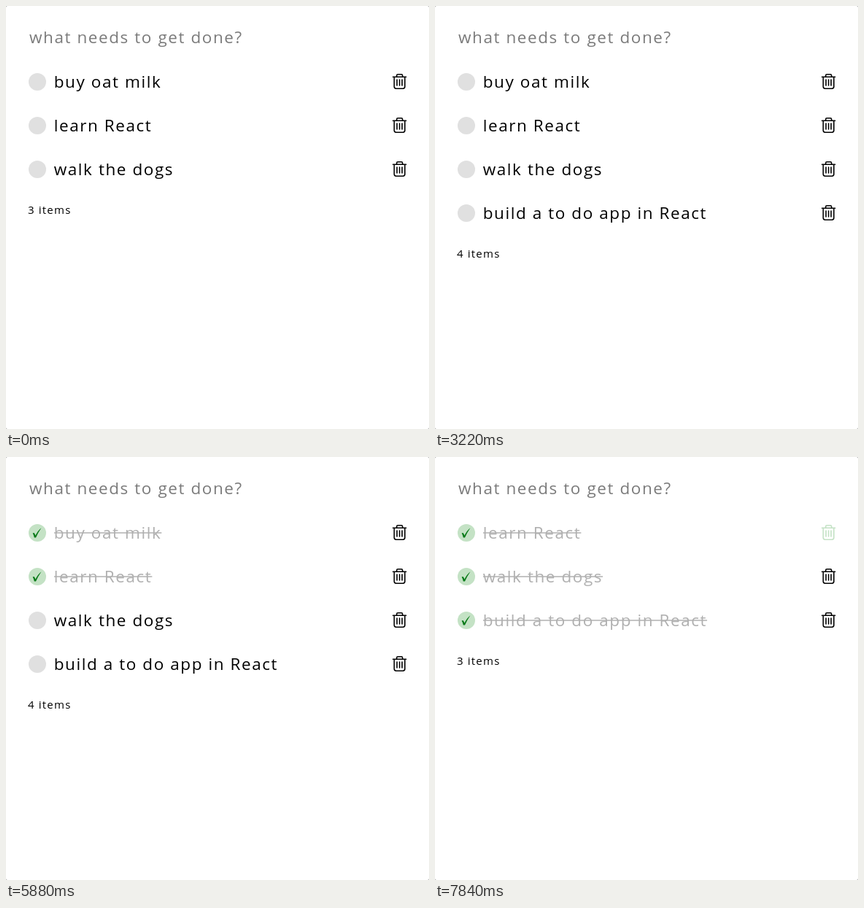
Animation, 580 px wide and 580 px high, one loop 8 s. Source, as an HTML page:

```html
<!DOCTYPE html>
<html lang="en">
<head>
<meta charset="utf-8">
<title>To do list</title>
<style>
  html, body { margin: 0; height: 100%; overflow: hidden; background: #999; }
  svg { display: block; width: 100vw; height: 100vh; }
  text { font: 22.5px "Open Sans", "Noto Sans", sans-serif; letter-spacing: 1.57px; white-space: pre; }
  #count { font-size: 15px; letter-spacing: 1.2px; }
  .bin { fill: none; stroke-width: 1.6; stroke-linecap: round; stroke-linejoin: round; }
</style>
</head>
<body>
<svg id="stage" viewBox="0 0 580 580">
  <rect width="580" height="580" rx="2" fill="#fff"/>
  <text id="field" x="32" y="51"></text>
  <rect id="caret" y="29" height="28" fill="#45607a"/>
  <g id="list"></g>
  <text id="count" x="30" y="285"></text>
</svg>
<script>
const LOOP = 8000, ROW = 60, TEXT_X = 65.7;
const PASTE = 1610, ADD = 2310, HOVER = 7700, REMOVE = 7840;
const NEW_ITEM = 'build a to do app in React';
const HINT = 'what needs to get done?';
const CARET_ON = [[910, 1470], [1610, 2100], [2660, 3150], [3710, 4200]];
const BIN = 'M535.7 97V95.4q0-1.6 1.6-1.6h4.8q1.6 0 1.6 1.6V97M530.6 97.2H548.6' +
  'M532.3 97.4V110.6q0 2.6 2.6 2.6h9.4q2.6 0 2.6-2.6V97.4' +
  'M536.1 101v8M539.6 101v8M543.1 101v8';
const TICK = 'M36.6 104.6q1.8-1.2 2.5.2l1.4 2.8Q43.5 101 48.4 97.2' +
  'Q43.4 104.5 41 110.6h-2.2Q38 107 36.6 104.6z';

const $ = id => document.getElementById(id);
const set = (el, attrs) => {
  for (const k in attrs) el.setAttribute(k, attrs[k]);
  return el;
};
const add = (parent, tag, attrs) =>
  parent.appendChild(set(document.createElementNS('http://www.w3.org/2000/svg', tag), attrs));
const ramp = (t, start, length) => Math.min(1, Math.max(0, (t - start) / length));
const mix = (a, b, p) => `rgb(${a.map((v, i) => Math.round(v + (b[i] - v) * p))})`;

function makeRow([label, doneAt]) {
  const group = add($('list'), 'g', {});
  const disc = add(group, 'circle', { cx: 43, cy: 104, r: 12 });
  const tick = add(group, 'path', { d: TICK, fill: '#087a18' });
  const text = add(group, 'text', { x: TEXT_X, y: 112 });
  text.textContent = label;
  const strike = add(group, 'path', { stroke: '#b0b0b0', 'stroke-width': 1.6 });
  set(strike, { d: `M66 104H${TEXT_X + text.getComputedTextLength()}` });
  const bin = add(group, 'path', { d: BIN, class: 'bin' });
  return { group, disc, tick, text, strike, bin, doneAt };
}

const rows = [
  ['buy oat milk', 4480],
  ['learn React', 5390],
  ['walk the dogs', 6160],
  [NEW_ITEM, 6930]
].map(makeRow);

function drawRow(row, i, t) {
  const slot = i - (t >= REMOVE);
  const shown = slot >= 0 && (i < 3 || t >= ADD);
  const done = t >= row.doneAt;
  set(row.group, { transform: `translate(0 ${slot * ROW})`, visibility: shown ? 'visible' : 'hidden' });
  set(row.disc, { fill: mix([224, 224, 224], [196, 226, 197], ramp(t, row.doneAt, 250)) });
  set(row.tick, { opacity: done ? 0.4 + 0.6 * ramp(t, row.doneAt, 490) : 0 });
  set(row.text, { fill: done ? '#b0b0b0' : '#000' });
  set(row.strike, { opacity: +done });
  set(row.bin, { stroke: slot === 0 && t >= HOVER ? '#c4e2c5' : '#000' });
}

function draw(t) {
  const typed = t >= PASTE && t < ADD;
  const four = t >= ADD && t < REMOVE;
  const blink = CARET_ON.some(([from, to]) => t >= from && t < to);
  $('field').textContent = typed ? NEW_ITEM : HINT;
  set($('field'), { fill: typed ? '#45607a' : '#7b7b7b' });
  set($('caret'), { x: typed ? 336.5 : 32, width: typed ? 1.5 : 2, opacity: +blink });
  rows.forEach((row, i) => drawRow(row, i, t));
  $('count').textContent = (four ? 4 : 3) + ' items';
  set($('count'), { y: four ? 345 : 285 });
}

const start = performance.now();
function tick() {
  draw((performance.now() - start) % LOOP);
  requestAnimationFrame(tick);
}
tick();
</script>
</body>
</html>
```
